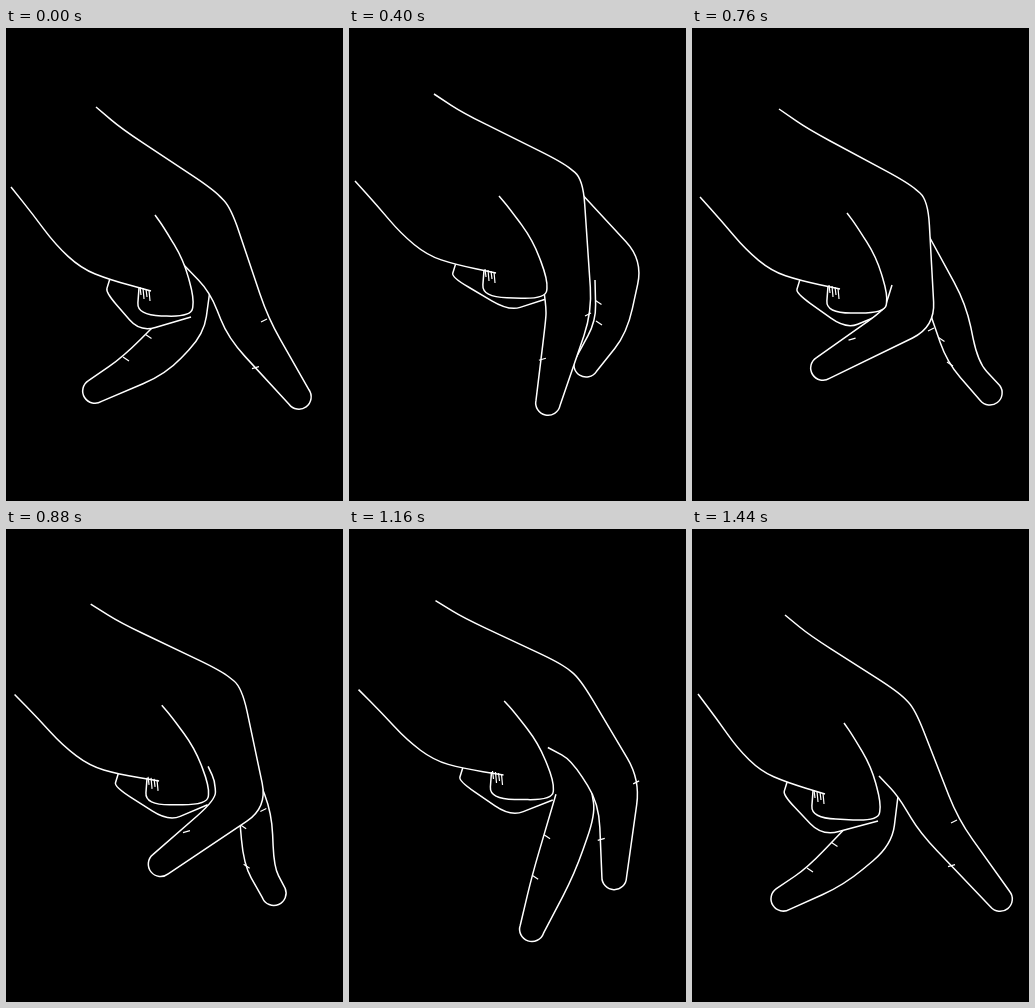
An HTML page for the animation above (1480 ms loop, 337x473 px).

```html
<!DOCTYPE html>
<html lang="en">
<head>
<meta charset="utf-8">
<title>Walking fingers</title>
<style>
  html, body { margin: 0; width: 100%; height: 100%; overflow: hidden; background: #000; }
  svg { display: block; width: 100vw; height: 100vh; }
  path { fill: none; stroke: #fff; stroke-width: 1.5; stroke-linejoin: round; }
  .solid { fill: #000; }
  .fine { stroke-width: 1.2; }
</style>
</head>
<body>
<svg viewBox="0 0 337 473">
  <path id="far" class="solid"/>
  <path id="farCreases" class="fine"/>
  <path id="curl" class="solid"/>
  <path id="near" class="solid"/>
  <path id="nearCreases" class="fine"/>
  <path id="thumb" class="solid"/>
  <path id="wrist"/>
  <path id="nail" class="fine"/>
</svg>
<script>
const LOOP = 1480, STEP = 40, TIP = 12.3;
const tracks = { hand: [], near: [], far: [] };

// Joints as x, y pairs:
// hand: top of wrist, knuckle, wrist start, wrist end, thumb start, thumb heel, curled finger
// near: outer joint, fingertip, inner joint, crotch, root
// far: start, outer joint, outer pad, fingertip, inner joint, root
function pose(t, parts) {
  for (const name in parts) tracks[name].push({ t, v: parts[name] });
}

pose(0, {
  hand: [90,79, 225,180, 5,159, 145,263, 149,187, 185,289, 134,304],
  near: [262,290, 293,369, 222,310, 204,264, 175,234],
  far: [204,262, 198,306, 160,346, 89,363, 117,329, 162,284]
});
pose(160, {
  hand: [86,73, 233,163, 10,159, 152,254, 153,178, 195,277, 152,292],
  near: [249,312, 266,371, 219,325, 208,290, 196,255],
  far: [222,290, 215,305, 176,338, 125,319, 164,302, 200,268]
});
pose(400, {
  hand: [85,66, 234,151, 6,153, 147,245, 150,168, 197,271, 160,283],
  near: [243,284, 199,375, 197,290, 197,280, 195,263],
  far: [230,163, 294,232, 278,305, 237,337, 247,293, 246,252]
});
pose(560, {
  near: [242,290, 160,367, 180,308, 192,284, 198,258],
  far: [234,185, 285,256, 302,315, 303,358, 262,312, 234,272]
});
pose(760, {
  hand: [87,81, 236,172, 8,169, 148,261, 155,185, 193,285, 154,301],
  near: [243,299, 131,340, 192,282, 196,270, 200,257],
  far: [232,199, 274,276, 286,334, 298,365, 255,334, 238,285]
});
pose(1000, {
  hand: [83,69, 235,145, 9,161, 157,243, 156,168, 209,267, 169,284],
  near: [281,256, 195,337, 229,265, 221,235, 203,218],
  far: [260,270, 257,288, 248,340, 229,368, 215,335, 220,232]
});
pose(1180, {
  far: [240,255, 245,285, 222,345, 177,399, 180,345, 205,268]
});
pose(1280, {
  hand: [90,77, 227,160, 9,162, 148,253, 154,180, 196,279, 150,295],
  near: [288,260, 305,359, 253,286, 217,239, 194,228],
  far: [239,266, 237,285, 200,346, 147,369, 168,328, 194,272]
});
pose(1440, {
  hand: [93,86, 223,180, 6,165, 133,265, 152,194, 186,292, 130,307],
  near: [266,290, 308,370, 228,304, 206,267, 187,247],
  far: [206,267, 200,316, 152,356, 91,370, 115,339, 164,288]
});

// Joints of a part at time t, by periodic cubic interpolation.
function joints(track, t) {
  const n = track.length;
  const at = i => {
    const k = track[(i + n) % n];
    return { t: k.t + LOOP * Math.floor(i / n), v: k.v };
  };
  let i = n - 1;
  while (track[i].t > t) i--;
  const [a, b, c, d] = [at(i - 1), at(i), at(i + 1), at(i + 2)];
  const h = c.t - b.t, u = (t - b.t) / h;
  const slope = (p, q, r, j) => {
    const l = q.t - p.t, m = r.t - q.t;
    return ((q.v[j] - p.v[j]) / l * m + (r.v[j] - q.v[j]) / m * l) / (l + m);
  };
  const v = b.v.map((p, j) => {
    const q = c.v[j], s = slope(a, b, c, j) * h, e = slope(b, c, d, j) * h;
    return p + u * (s + u * (3 * (q - p) - 2 * s - e + u * (2 * (p - q) + s + e)));
  });
  return Array.from({ length: v.length / 2 }, (_, j) => [v[2 * j], v[2 * j + 1]]);
}

const add = ([x, y], dx, dy) => [x + dx, y + dy];
const mix = (p, q, u) => [p[0] + (q[0] - p[0]) * u, p[1] + (q[1] - p[1]) * u];
const gap = (p, q) => Math.hypot(q[0] - p[0], q[1] - p[1]) || 0.01;
const str = p => p.map(n => n.toFixed(2)).join(' ');

// Point at u along the chord p-q, moved sideways by v chord lengths.
function along(p, q, u, v) {
  return add(mix(p, q, u), -v * (q[1] - p[1]), v * (q[0] - p[0]));
}

// Polyline with rounded corners.
function soft(pts, k, cap = 25, start = 'M') {
  const cut = (p, q) => mix(p, q, Math.min(k, cap / gap(p, q)));
  let d = start + str(pts[0]);
  for (let i = 1; i < pts.length - 1; i++) {
    const p = pts[i];
    d += `L${str(cut(p, pts[i - 1]))}Q${str(p)} ${str(cut(p, pts[i + 1]))}`;
  }
  return d + 'L' + str(pts.at(-1));
}

// Outer edge, round tip, inner edge.
function finger(outer, tip, inner) {
  const a = outer.at(-1), b = inner[0], l = gap(a, tip), m = gap(b, tip);
  const x = (tip[0] - a[0]) / l + (tip[0] - b[0]) / m;
  const y = (tip[1] - a[1]) / l + (tip[1] - b[1]) / m;
  const r = TIP / Math.hypot(x, y);
  const arc = `A${TIP} ${TIP} 0 0 1 `;
  return soft([...outer, add(tip, y * r, -x * r)], 0.4) +
    soft([add(tip, -y * r, x * r), ...inner], 0.4, 25, arc);
}

const dash = (p, dx, dy) => `M${str(p)}l${dx} ${dy}`;

function draw(t) {
  const [top, knuckle, wrist, end, thumb, heel, curl] = joints(tracks.hand, t);
  const [joint, tip, inner, crotch, root] = joints(tracks.near, t);
  const [start, farJoint, pad, farTip, farInner, farRoot] = joints(tracks.far, t);
  const fold = along(wrist, end, 0.77, 0.087);
  const onThumb = (u, v) => along(thumb, heel, u, v);
  const onWrist = (u, v) => along(wrist, end, u, v);

  const paths = {
    far: finger([start, farJoint, pad], farTip, [farInner, farRoot]),
    farCreases: dash(farInner, 6, 4) + dash(mix(farInner, farRoot, 0.5), 6, 4),
    curl: soft([fold, add(fold, -4, 13), curl, heel], 0.3),
    near: finger([top, along(top, knuckle, 0.2, 0.012), along(top, knuckle, 0.85, -0.025), knuckle, joint],
      tip, [inner, crotch, root]),
    nearCreases: dash(add(joint, -7, 4), 6, -3) + dash(mix(inner, tip, 0.45).map((n, i) => n - (i ? -4 : 8)), 7, -2),
    thumb: soft([thumb, onThumb(0.12, -0.035), onThumb(0.48, -0.11), onThumb(0.85, -0.085), heel,
      add(end, -14, 24), add(end, -12, -3)], 0.45),
    wrist: soft([wrist, onWrist(0.19, 0.05), onWrist(0.4, 0.113), onWrist(0.6, 0.135), onWrist(0.77, 0.09), end], 0.5),
    nail: [0, 1, 2, 3].map(i => dash(add(end, 3 * i - 11, i - 4), 1, i % 2 ? 11 : 8)).join('')
  };
  for (const id in paths) document.getElementById(id).setAttribute('d', paths[id]);
}

const begin = performance.now();

function tick() {
  const t = (performance.now() - begin) % LOOP;
  draw(Math.floor(t / STEP) * STEP);
  requestAnimationFrame(tick);
}

tick();
</script>
</body>
</html>
```
